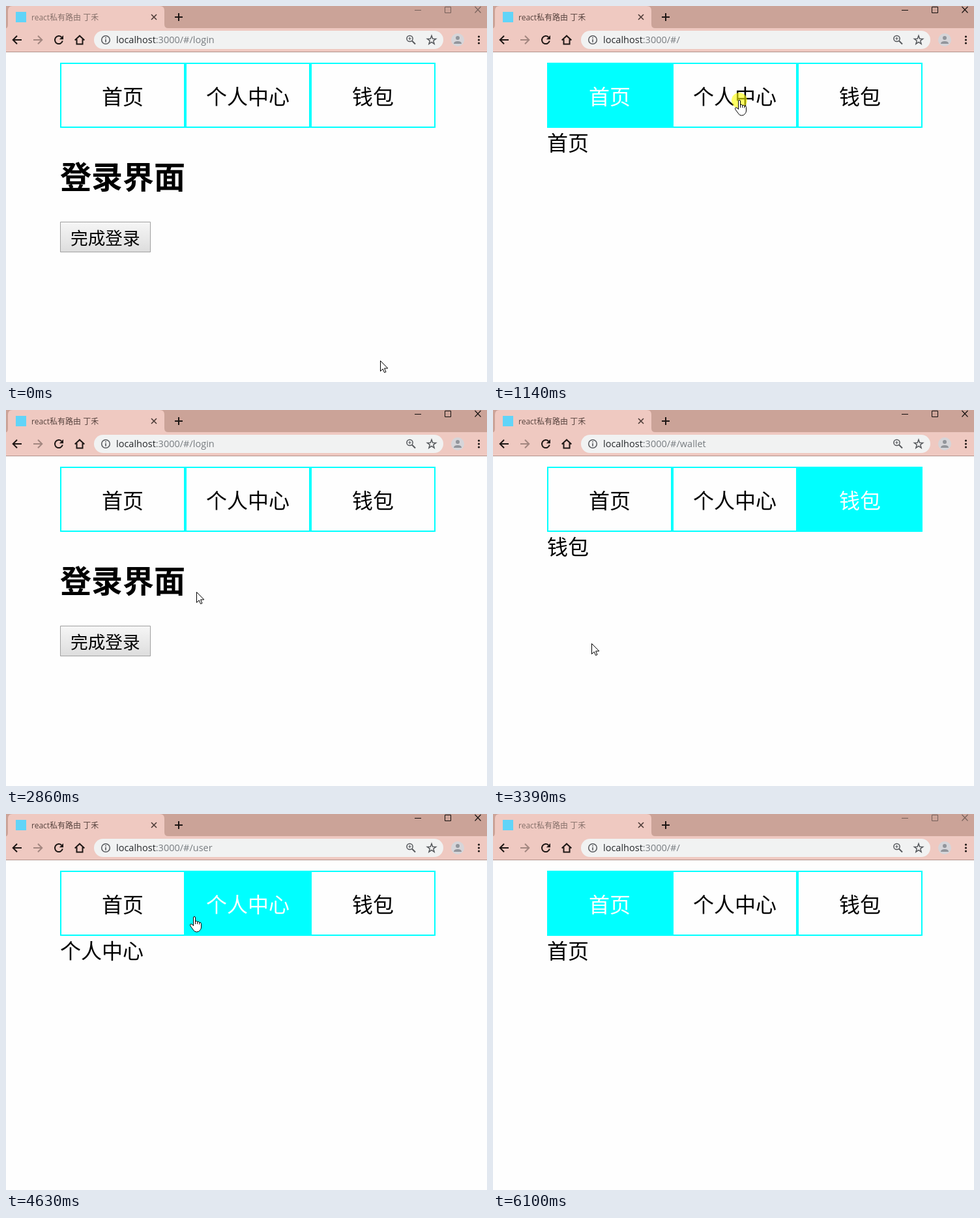
These frames come from a looping animation (738x577 px, 6170 ms). An HTML page with a canvas:

```html
<!DOCTYPE html>
<html lang="zh-CN">
<head>
<meta charset="utf-8">
<title>react私有路由</title>
<style>
html, body { margin: 0; width: 100%; height: 100%; overflow: hidden; background: #fefefe; }
canvas { display: block; }
</style>
</head>
<body>
<canvas id="stage" width="738" height="577"></canvas>
<script>
const ctx = document.getElementById('stage').getContext('2d');
const LOOP = 6170;
const CYAN = '#00ffff', PAGE = '#fefefe', BAR = '#efc9c1', INK = '#1d1614';
const CJK = '"Noto Sans CJK SC", "Noto Sans CJK", sans-serif';
const MIXED = '"Open Sans", ' + CJK;

const TABS = [
  { id: 'home', label: '首页', path: '' },
  { id: 'user', label: '个人中心', path: 'user' },
  { id: 'wallet', label: '钱包', path: 'wallet' }
];

// [time, route]
const ROUTES = [
  [0, 'login'], [590, 'home'], [1290, 'login'], [3390, 'wallet'], [4240, 'user'], [5170, 'home']
];

// [first step, last step, number of steps, x, y]
const START = { x: 574, y: 544 };
const MOVES = [
  [70, 370, 5, 196, 125],
  [740, 990, 4, 378, 145],
  [1370, 1760, 6, 564, 148],
  [2000, 2070, 2, 540, 148],
  [2150, 2230, 2, 426, 148],
  [2310, 2460, 3, 526, 149],
  [2610, 2990, 5, 151, 358],
  [3770, 4010, 4, 324, 165],
  [4240, 4240, 1, 333, 164],
  [4320, 5020, 10, 217, 147],
  [5320, 5700, 6, 668, 554]
];

// [down, up]
const CLICKS = [
  [440, 590], [1140, 1290], [1840, 1930], [2230, 2310],
  [2530, 2610], [3220, 3390], [4090, 4240], [5090, 5170]
];
const FOCUS = [440, 6100], CURSOR_GONE = 5780;

const within = (t, [a, b]) => t >= a && t < b;
const ease = p => 0.5 * p + 0.5 * p * p * (3 - 2 * p);

function pointerAt(t) {
  let { x, y } = START;
  for (const [first, last, n, tx, ty] of MOVES) {
    if (t < first) break;
    const gap = n > 1 ? (last - first) / (n - 1) : 1;
    const done = Math.min(n, Math.floor((t - first) / gap + 1e-6) + 1);
    const p = ease(done / n);
    x += (tx - x) * p;
    y += (ty - y) * p;
  }
  return { x: Math.round(x), y: Math.round(y) };
}

function routeAt(t) {
  let route = ROUTES[0][1];
  for (const [start, name] of ROUTES) if (t >= start) route = name;
  return route;
}

function rect(x, y, w, h, color) {
  ctx.fillStyle = color;
  ctx.fillRect(x, y, w, h);
}

function text(str, x, y, font, color) {
  ctx.font = font;
  ctx.fillStyle = color;
  ctx.fillText(str, x, y);
  return ctx.measureText(str).width;
}

function stroke(d, color, width = 2, x = 0, y = 0) {
  ctx.save();
  ctx.translate(x, y);
  ctx.strokeStyle = color;
  ctx.lineWidth = width;
  ctx.stroke(new Path2D(d));
  ctx.restore();
}

function fill(d, color, x = 0, y = 0) {
  ctx.save();
  ctx.translate(x, y);
  ctx.fillStyle = color;
  ctx.fill(new Path2D(d));
  ctx.restore();
}

function disc(x, y, r, color) {
  ctx.fillStyle = color;
  ctx.beginPath();
  ctx.arc(x, y, r, 0, Math.PI * 2);
  ctx.fill();
}

function ring(x, y, r, color, width) {
  ctx.strokeStyle = color;
  ctx.lineWidth = width;
  ctx.beginPath();
  ctx.arc(x, y, r, 0, Math.PI * 2);
  ctx.stroke();
}

function drawTitleBar(focused) {
  rect(0, 0, 738, 34, '#cba398');
  fill('M0 34 Q3 34 3 28 V7 Q3 0 10 0 H236 Q243 0 243 7 V28 Q243 34 249 34 Z', BAR);
  rect(15, 9, 16, 16, '#61d4f8');
  text('react私有路由 丁禾', 39, 22, '12px ' + MIXED, focused ? '#57433e' : '#86706a');
  stroke('M-4 -4 L4 4 M4 -4 L-4 4', '#4b3a36', 1.6, 227, 17);
  stroke('M-6 0 H6 M0 -6 V6', INK, 2, 265, 17);
  const tone = focused ? '#120e0d' : '#75605a';
  rect(627, 6, 10, 1, tone);
  stroke('M673.5 1.5 H682.5 V10.5 H673.5 Z', tone, 1);
  stroke('M719.5 1 L728.5 10.5 M728.5 1 L719.5 10.5', tone, 1.1);
}

function drawToolbar(route) {
  rect(0, 34, 738, 36, BAR);
  rect(0, 70, 738, 1, '#b3938c');
  const arrow = 'M7 0 H-6 M0 -6.3 L-6.3 0 L0 6.3';
  stroke(arrow, INK, 2, 17, 52);
  stroke('M-7 0 H6 M0 -6.3 L6.3 0 L0 6.3', '#a38780', 2, 49, 52);
  stroke('M4.2 -4.2 A6 6 0 1 0 5.8 1.6', INK, 2, 81, 52);
  fill('M7 -7 V-.8 H.8 Z', INK, 81, 52);
  stroke('M-7.3 .5 L0 -6.3 L7.3 .5 M-4.5 -1 V6.5 H4.5 V-1', INK, 2, 113, 52);

  ctx.fillStyle = '#f1f2f2';
  ctx.beginPath();
  ctx.roundRect(135, 38, 536, 28, 14);
  ctx.fill();
  ring(153, 52, 6.3, '#55585c', 1.5);
  rect(152.2, 51, 1.6, 4.6, '#55585c');
  rect(152.2, 48, 1.6, 1.7, '#55585c');

  const tab = TABS.find(item => item.id === route);
  const font = '14.5px ' + MIXED;
  const w = text('localhost', 169, 57, font, '#25282b');
  text(':3000/#/' + (tab ? tab.path : route), 169 + w, 57, font, '#777c80');

  ring(619.5, 50, 4.6, '#55585c', 1.5);
  stroke('M623 53.5 L628 58.5', '#55585c', 2);
  stroke('M617.3 50 H621.7 M619.5 47.8 V52.2', '#55585c', 1);
  let star = '';
  for (let i = 0; i < 10; i++) {
    const r = i % 2 ? 2.9 : 7, a = i * Math.PI / 5;
    star += (i ? 'L' : 'M') + r * Math.sin(a) + ' ' + -r * Math.cos(a);
  }
  stroke(star + 'Z', '#55585c', 1.5, 653, 52.5);

  disc(693, 52, 10, '#d6d5d9');
  disc(693, 49, 3, '#92959b');
  fill('M-6 6 Q-6 2 0 2 Q6 2 6 6 Z', '#92959b', 693, 52);
  for (const y of [47, 52, 57]) disc(725.5, y, 1.6, INK);
}

function drawNav(route) {
  TABS.forEach((tab, i) => {
    const x = 83 + i * 192, active = tab.id === route;
    rect(x, 87, 192, 100, CYAN);
    if (!active) rect(x + 2, 89, 188, 96, PAGE);
    const left = x + 96 - tab.label.length * 16;
    text(tab.label, left, 151, '32px ' + CJK, active ? '#fff' : '#000');
  });
}

function drawLogin(hover, pressed) {
  text('登录界面', 83, 280, 'bold 48px ' + CJK, '#000');
  const g = ctx.createLinearGradient(0, 331, 0, 378);
  const [top, bottom] = pressed ? ['#e2e2e2', '#ededed'] : hover ? ['#fafafa', '#e4e4e4'] : ['#f6f6f6', '#dddddd'];
  g.addColorStop(0, top);
  g.addColorStop(1, bottom);
  rect(83, 331, 139, 47, g);
  stroke('M83.5 331.5 H221.5 V377.5 H83.5 Z', hover ? '#8a8a8a' : '#a0a0a0', 1);
  text('完成登录', 99, 366, '26.67px ' + CJK, '#000');
}

function drawShape(d, x, y) {
  fill(d, '#fff', x, y);
  stroke(d, '#000', 1, x, y);
}

function drawPointer({ x, y }) {
  if (x >= 83 && x < 659 && y >= 87 && y < 187) {
    const hand = 'M5.5 14.5 V2 Q5.5 .5 7 .5 Q8.5 .5 8.5 2 V7.5 Q11.5 6.5 11.7 8.5 ' +
      'Q14.5 7.5 14.8 9.5 Q17.5 9 17.5 11.5 V17 Q17.5 19.5 15.5 21.5 Q14 24 10.5 24 ' +
      'Q7 24 5.5 21 L1 15 Q0 13 1.2 12 Q2.7 11.3 4 12.8 Z';
    drawShape(hand, x - 7, y - 1);
    stroke('M8.5 7 V12 M11.6 8.5 V12 M14.7 9.5 V12.5', '#000', 1, x - 7, y - 1);
  } else {
    drawShape('M.5 .5 V16.5 L4.2 13 L6.6 18.5 L9 17.5 L6.6 12 H11.8 Z', x, y);
  }
}

function draw(t) {
  const route = routeAt(t), pointer = pointerAt(t);
  const clicking = CLICKS.some(span => within(t, span));
  rect(0, 0, 738, 577, PAGE);
  drawTitleBar(within(t, FOCUS));
  drawToolbar(route);
  drawNav(route);
  if (route === 'login') {
    const hover = pointer.x >= 83 && pointer.x < 222 && pointer.y >= 331 && pointer.y < 378;
    drawLogin(hover, hover && clicking);
  } else {
    text(TABS.find(tab => tab.id === route).label, 83, 222, '32px ' + CJK, '#000');
  }
  if (clicking) disc(pointer.x, pointer.y, 12, 'rgba(255, 255, 0, .6)');
  if (t < CURSOR_GONE) drawPointer(pointer);
}

let begin;
function tick(now) {
  begin ??= now;
  draw(Math.max(0, now - begin) % LOOP);
  requestAnimationFrame(tick);
}
draw(0);
requestAnimationFrame(tick);
</script>
</body>
</html>
```
